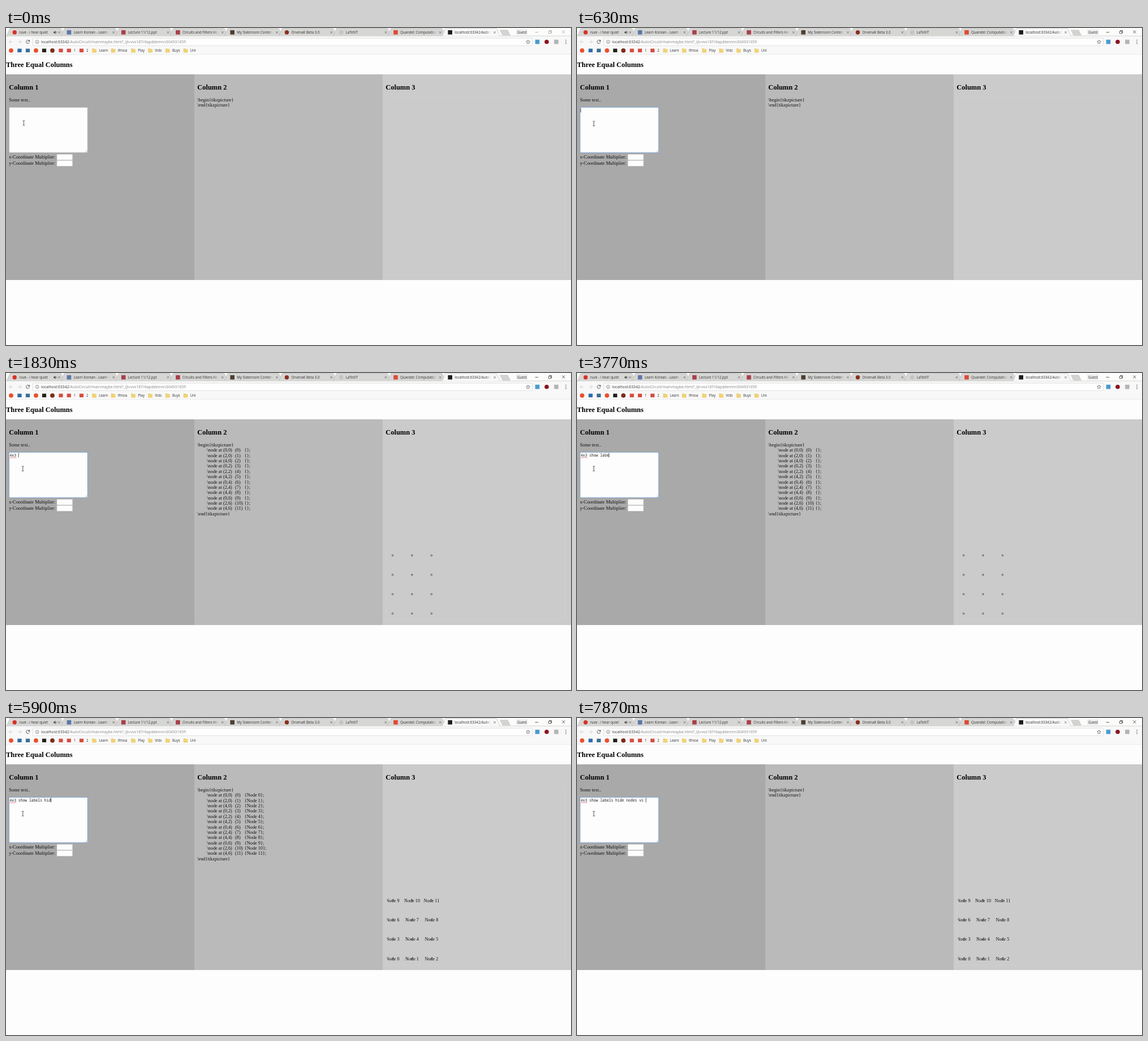
An HTML page that plays this animation: 999 px wide and 561 px high, repeating every 8 s.

```html
<!DOCTYPE html>
<html lang="en">
<head>
<meta charset="utf-8">
<title>Three Equal Columns</title>
<style>
html, body { margin: 0; width: 100%; height: 100%; overflow: hidden; background: #fdfdfd; }
svg { display: block; width: 100%; height: 100%; }
text { white-space: pre; }
.ui { font: 6.2px "Open Sans", "Noto Sans", sans-serif; fill: #333; }
.url { font-size: 6.75px; }
.body { font: 8.32px "Liberation Serif", serif; fill: #111; }
.head { font: bold 12.48px "Liberation Serif", serif; fill: #000; }
.mono { font: 6.4px "Noto Sans Mono", "DejaVu Sans Mono", monospace; fill: #222; }
.label { font: 8.2px "Liberation Serif", serif; fill: #111; text-anchor: middle; }
</style>
</head>
<body>
<svg id="stage" viewBox="0 0 999 561" preserveAspectRatio="none">
  <defs>
    <linearGradient id="fadeTab"><stop stop-color="#d6d6d4" stop-opacity="0"/><stop offset="1" stop-color="#d6d6d4"/></linearGradient>
    <linearGradient id="fadeTop"><stop stop-color="#f8f8f8" stop-opacity="0"/><stop offset="1" stop-color="#f8f8f8"/></linearGradient>
    <clipPath id="plot"><rect x="673.7" y="121" width="315" height="316"/></clipPath>
  </defs>
</svg>
<script>
const NS = 'http://www.w3.org/2000/svg';
const stage = document.getElementById('stage');

function add(tag, attrs, parent = stage) {
  const el = document.createElementNS(NS, tag);
  for (const k in attrs) el.setAttribute(k, attrs[k]);
  return parent.appendChild(el);
}
function text(x, y, str, cls, parent, extra) {
  const el = add('text', { x, y, class: cls, ...extra }, parent);
  el.textContent = str;
  return el;
}
const rect = (x, y, width, height, fill, extra, parent) =>
  add('rect', { x, y, width, height, fill, ...extra }, parent);
const dot = (cx, cy, r, fill, extra, parent) =>
  add('circle', { cx, cy, r, fill, ...extra }, parent);
const line = (d, stroke, w = 0.7, extra, parent) =>
  add('path', { d, stroke, 'stroke-width': w, fill: 'none', ...extra }, parent);
const square = (x, y, fill) => rect(x - 3.8, y - 3.8, 7.6, 7.6, fill);
const show = (el, on) => el.setAttribute('visibility', on ? 'visible' : 'hidden');

// Browser tabs
const PITCH = 96.25;
const tabs = [
  ['ruve - i hear quiet', '#d93025', 'o'],
  ['Learn Korean - Learn Ha', '#5b78a8', 's'],
  ['Lecture 11/12.ppt', '#a8404a', 's'],
  ['Circuits and Filters Ho', '#a8404a', 's'],
  ['My Slateroom Content', '#4b4030', 's'],
  ['OrvenaK Beta 3.0', '#8a3020', 'o'],
  ['LaTeXiT', '#c4c4c4', 'o'],
  ['Quandel: Computation', '#dd4a35', 's'],
  ['localhost:63342/AutoCi', '#1c1c1c', 's']
];
rect(0, 0, 999, 14, '#fcfcfb');
rect(0, 14, 999, 33, '#f8f8f8');
line('M0 14H999', '#bdbdbd', 0.6);
tabs.forEach(([name, color, kind], i) => {
  const x = 4 + i * PITCH, top = i === tabs.length - 1;
  const back = top ? '#f8f8f8' : '#d6d6d4';
  add('path', {
    d: `M${x - 3} 14.3L${x + 2.5} 1.5Q${x + 3} .6 ${x + 4.2} .6H${x + 92}Q${x + 93.2} .6 ${x + 93.7} 1.5L${x + 99.3} 14.3`,
    fill: back, stroke: '#aaa', 'stroke-width': 0.5
  });
  if (kind === 'o') dot(x + 11.2, 7.7, 3.7, color);
  else square(x + 11.2, 7.7, color);
  text(x + 19.2, 10, name, 'ui');
  const end = x + (i ? 83 : 76);
  rect(end - 8, 2, 8, 11, `url(#${top ? 'fadeTop' : 'fadeTab'})`);
  rect(end, 2, 9, 11, back);
  if (!i) {
    add('path', { d: 'M84 6.6H85.6L87.7 4.8V10.8L85.6 9H84Z', fill: '#555' });
    line('M89 6Q90.3 7.8 89 9.6', '#555', 0.6);
  }
  const c = x + 90;
  line(`M${c - 1.9} 5.8l3.8 3.8m0 -3.8l-3.8 3.8`, '#555', 0.7);
});
add('path', { d: 'M873.5 3.8H887L891.5 12.8H878Z', fill: '#d3d3d1', stroke: '#b5b5b5', 'stroke-width': 0.5 });
rect(902, 2.5, 20, 9.5, '#ececec');
text(904, 9.6, 'Guest', 'ui', stage, { fill: '#555' });

const controls = add('g', { 'stroke-width': 0.7, fill: 'none' });
add('path', { d: 'M935.5 7.5h5.5M959.5 5.8h4v4h-4zM960.7 5.8v-1.3h4v4h-1.2M983.2 4.3l5.2 5.2m0 -5.2l-5.2 5.2' }, controls);

// Toolbar
line('M12 24.5H5.5M8.5 21.5L5.5 24.5L8.5 27.5M21 24.5H27.5M24.5 21.5L27.5 24.5L24.5 27.5', '#cfcfcf', 0.9);
line('M41 22.6A3 3 0 1 0 41.4 25.4', '#555', 1);
add('path', { d: 'M42 20.8V24H38.8Z', fill: '#555' });
rect(47.5, 18, 883, 13.2, '#fefefe', { rx: 1, stroke: '#cfcfcf', 'stroke-width': 0.6 });
dot(55.2, 24.5, 3, 'none', { stroke: '#666', 'stroke-width': 0.7 });
line('M55.2 24V26.3M55.2 22.6V23.3', '#666', 0.8);
const url = text(62, 27, '', 'ui url');
[['localhost:63342', '#333'], ['/AutoCircuit/mainmaybe.html?_ijt=vvs187r6apddemnn30493165fl', '#858585']]
  .forEach(([str, color]) => { add('tspan', { style: `fill:${color}` }, url).textContent = str; });

let star = '';
for (let i = 0; i < 10; i++) {
  const a = Math.PI * (i / 5 - 0.5), r = i % 2 ? 1.6 : 3.6;
  star += `${i ? 'L' : 'M'}${923 + r * Math.cos(a)} ${24.8 + r * Math.sin(a)}`;
}
line(star + 'Z', '#555', 0.7);
square(939.5, 24.5, '#4a9bcf');
dot(956, 24.5, 3.8, '#8c1522');
square(973, 24.5, '#b4b4b4');
[21.6, 24.5, 27.4].forEach(y => dot(990, y, 0.8, '#555'));

// Bookmarks
const marks = [
  [9, 'o', '#e9502e'], [24, 's', '#2b6cab'], [38.5, 's', '#3a7098'], [53, 'o', '#e9502e'],
  [67.5, 's', '#24221a'], [82, 'o', '#7c2d1c'], [97, 's', '#d64c40'],
  [111.3, 's', '#d64c40', '1'], [133.5, 's', '#d64c40', '2']
];
marks.forEach(([x, kind, color, name]) => {
  if (kind === 'o') dot(x, 39.8, 3.9, color);
  else rect(x - 3.6, 36.6, 7.2, 6.4, color);
  if (name) text(x + 8.5, 42, name, 'ui');
});
[[156, 'Learn'], [189.5, 'lfmoa'], [225, 'Play'], [255, 'Vids'], [285.7, 'Buys'], [317.5, 'Uni']]
  .forEach(([x, name]) => {
    add('path', { d: `M${x - 3.4} 36.6h2.8l.9 1h3.2v5.6h-6.9z`, fill: '#f3d371', stroke: '#dcb84e', 'stroke-width': 0.4 });
    text(x + 8.2, 42, name, 'ui');
  });
line('M0 47H999', '#d4d4d4', 0.6);

// Page
rect(0, 47.3, 999, 513.7, '#fdfdfd');
text(0, 69, 'Three Equal Columns', 'head');
['#a9a9a9', '#bababa', '#cbcbcb'].forEach((color, i) => {
  rect(333 * i, 82, 333, 364.3, color, { 'shape-rendering': 'crispEdges' });
  text(5.2 + 333 * i, 109, `Column ${i + 1}`, 'head');
});
text(5.2, 130, 'Some text..', 'body');
text(5.2, 231.4, 'x-Coordinate Multiplier:', 'body');
text(5.2, 242.3, 'y-Coordinate Multiplier:', 'body');
[223.6, 234.5].forEach(y => rect(90, y, 27.6, 10, '#fdfdfd', { stroke: '#c4c4c4', 'stroke-width': 0.5 }));
const area = rect(5.4, 140.3, 138.8, 80.4, '#fdfdfd', { 'stroke-width': 0.8 });
line('M140 220L143.6 216.4M142 220L143.6 218.4', '#888', 0.5);

const typed = text(6.5, 148, '', 'mono');
let wave = 'M6.5 149.8';
for (let i = 0; i < 6; i++) wave += 'q.5 -1 1 0t1 0';
const squiggle = line(wave, '#e02020', 0.6);
const caret = rect(0, 141.5, 0.7, 8, '#111');

// Generated code and drawing
const ROW = 9.37;
text(338.2, 130, '\\begin{tikzpicture}', 'body');
const code = add('g', {});
const closing = text(338.2, 0, '\\end{tikzpicture}', 'body');
rect(671.3, 121.3, 317, 315.7, 'none', { stroke: '#d3d3d3', 'stroke-width': 0.5 });
const plot = add('g', { 'clip-path': 'url(#plot)' });
const labels = add('g', {}, plot);
const bodies = [];
for (let i = 0; i < 12; i++) {
  const col = i % 3, row = Math.floor(i / 3), y = 130 + ROW * (i + 1);
  text(355.3, y, `\\node at (${2 * col},${2 * row})`, 'body', code);
  text(405, y, `(${i})`, 'body', code);
  bodies.push(text(421.8, y, '', 'body', code));
  const cx = 683.6 + 34.4 * col, cy = 425.7 - 34.3 * row;
  dot(cx, cy, 1.3, 'none', { stroke: '#333', 'stroke-width': 0.75 }, plot);
  text(cx, cy + 2.8, `Node ${i}`, 'label', labels);
}

// Mouse pointer
const pointer = add('g', {});
const beam = 'M-1.9 -4.2H-.7L0 -3.7L.7 -4.2H1.9M0 -3.7V3.7M-1.9 4.2H-.7L0 3.7L.7 4.2H1.9';
line(beam, '#fff', 1.6, { opacity: 0.6 }, pointer);
line(beam, '#222', 0.75, {}, pointer);

// Timeline: [ms, typed letters, caret hidden]
const LOOP = 8000, CHAR = 3.84;
const TEXT = '4x3 show labels hide nodes vs ';
const FOCUS = 530, GRID = 1730, LABELS = 3970, CLEAR = 6400;
const keys = [
  [0, 0], [1070, 0, 1], [1130, 1], [1400, 2], [1670, 3], [1800, 4], [1900, 5],
  [2070, 6], [2170, 7], [2330, 8], [2500, 9], [3000, 10], [3530, 10, 1],
  [3600, 11], [3670, 12], [3770, 13], [3900, 14], [4430, 15], [4600, 16],
  [5070, 16, 1], [5630, 17], [5730, 18], [5870, 19], [5970, 20], [6070, 21],
  [6170, 22], [6230, 23], [6300, 24], [6370, 25], [6500, 26], [7030, 27],
  [7530, 27, 1], [7630, 28], [7730, 29], [7870, 30]
];

function draw(now) {
  const t = now % LOOP;
  const [, n, off] = keys.filter(k => k[0] <= t).pop();
  const focused = t >= FOCUS, listed = t >= GRID && t < CLEAR, named = t >= LABELS;

  area.setAttribute('stroke', focused ? '#6fa3dc' : '#b0b0b0');
  controls.setAttribute('stroke', focused ? '#222' : '#999');
  const p = Math.min(1, Math.max(0, (t - 430) / 100));
  pointer.setAttribute('transform', `translate(${31.4 - 1.6 * p} ${168.2 + p})`);

  typed.textContent = TEXT.slice(0, n);
  caret.setAttribute('x', 6.4 + n * CHAR);
  show(caret, focused && !off);
  show(squiggle, n >= 4);

  show(code, listed);
  closing.setAttribute('y', 130 + ROW * (listed ? 13 : 1));
  bodies.forEach((b, i) => { b.textContent = named ? `{Node ${i}};` : '{};'; });
  show(plot, t >= GRID);
  show(labels, named);
}

const start = performance.now();
function tick() {
  draw(performance.now() - start);
  requestAnimationFrame(tick);
}
tick();
</script>
</body>
</html>
```
